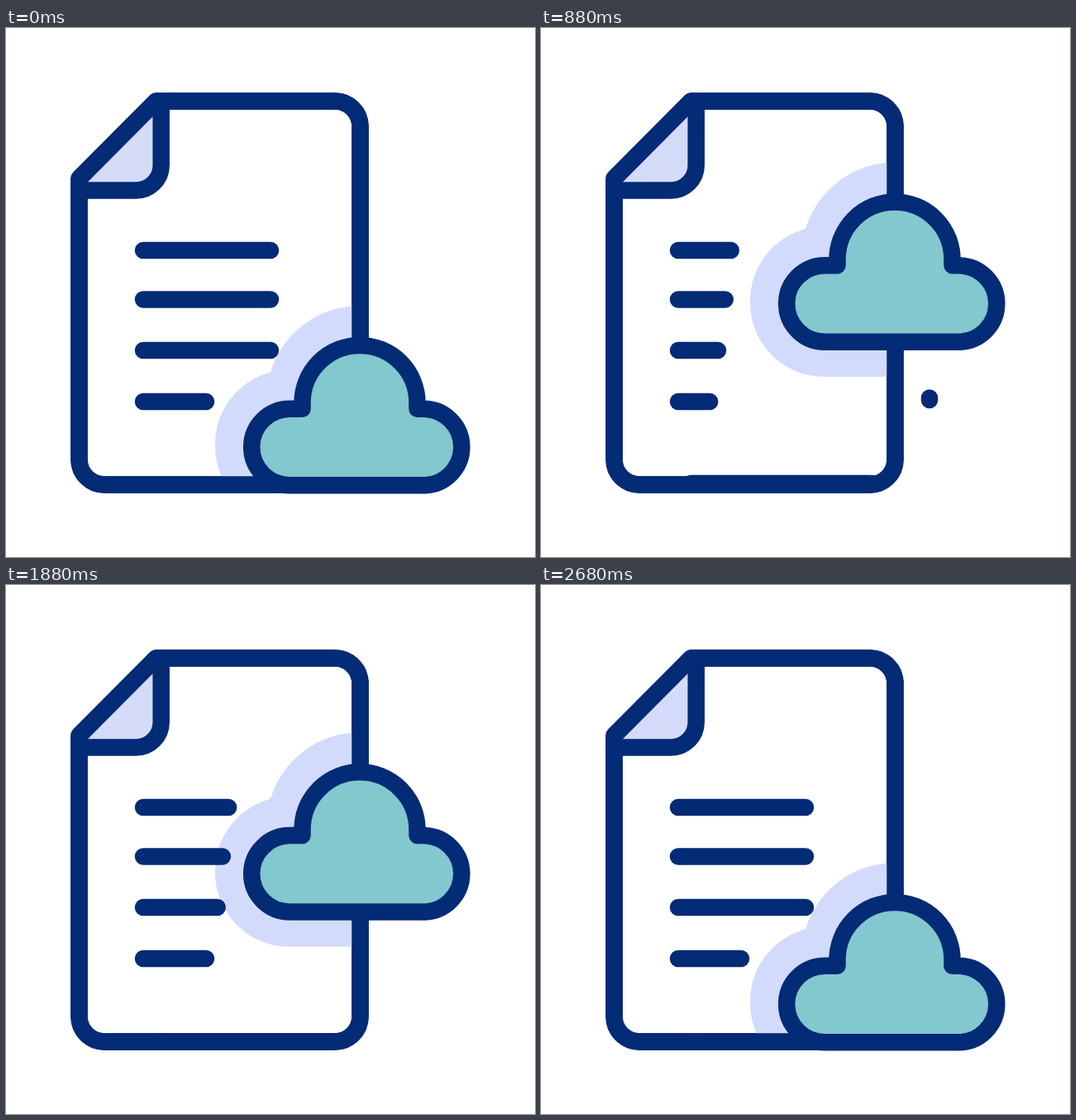
These frames come from a looping animation (640x640 px, 3 s). An HTML page:

```html
<!DOCTYPE html>
<html lang="en">
<head>
<meta charset="utf-8">
<title>Document cloud upload</title>
<style>
  html, body { margin: 0; width: 100%; height: 100%; overflow: hidden; background: #fff; }
  svg { display: block; width: 100%; height: 100%; }
  .ink { stroke: #032b76; stroke-width: 20.5; stroke-linecap: round; stroke-linejoin: round; fill: none; }
  .pale { fill: #d3dbfc; }
</style>
</head>
<body>
<svg viewBox="0 0 640 640">
  <defs>
    <path id="sheet" d="M181.5 88.5H398a30.5 30.5 0 0 1 30.5 30.5V522a30.5 30.5 0 0 1-30.5 30.5H119a30.5 30.5 0 0 1-30.5-30.5V182Z"/>
    <path id="fold" d="M187.7 88.5V166a30.5 30.5 0 0 1-30.5 30.5H88.5"/>
    <clipPath id="inSheet"><use href="#sheet"/></clipPath>
    <clipPath id="abovePage"><rect id="reveal" width="640" height="78"/></clipPath>
    <g id="page">
      <use href="#sheet" fill="#fff"/>
      <path class="pale" d="M181.5 88.5H187.7V166a30.5 30.5 0 0 1-30.5 30.5H88.5V182Z" style="fill:#d4dbf8"/>
      <use href="#fold" class="ink"/>
      <use href="#sheet" class="ink"/>
    </g>
  </defs>

  <use href="#page"/>
  <g clip-path="url(#inSheet)">
    <g id="slidingPage">
      <use href="#page"/>
      <g id="oldLines" class="ink"></g>
    </g>
    <path id="halo" class="pale" d="M440 595.5H343A90 89.5 0 0 1 253 506A90 90 0 0 1 320 416.5A113 113 0 0 1 428 336H440Z"/>
  </g>
  <use href="#sheet" class="ink"/>
  <g clip-path="url(#abovePage)"><g id="newLines" class="ink"></g></g>
  <g id="rain" class="ink"></g>
  <path id="cloud" class="ink" style="fill:#82c8ce" d="M505.1 553.2H343.4a46.2 46.2 0 0 1 0-92.4H358.5V453.5a69.5 69.5 0 0 1 139 0V460.8H505.1a46.2 46.2 0 0 1 0 92.4Z"/>
</svg>
<script>
const LOOP = 3000, STEP = 40;
const LEFT = 166, SHORT = 242;
const $ = id => document.getElementById(id);

const textLines = [
  { y: 269, end: 320 },
  { y: 328.5, end: 320 },
  { y: 390, end: 320 },
  { y: 452, end: SHORT }
];
const drops = [
  { x: 342, bottom: 450, grow: 880, shrink: 1276 },
  { x: 386.5, bottom: 488, grow: 900, shrink: 1340 },
  { x: 470, bottom: 450, grow: 820, shrink: 1256 }
];
const DROP_LENGTH = 70, DROP_TIME = 400;

// Equivalent to cubic-bezier(.5, 0, .5, 1).
function ease(u) {
  if (u <= 0) return 0;
  if (u >= 1) return 1;
  let lo = 0, hi = 1;
  for (let i = 0; i < 24; i++) {
    const s = (lo + hi) / 2;
    if (1.5 * s * (1 - s) + s ** 3 < u) lo = s; else hi = s;
  }
  return lo * lo * (3 - 2 * lo);
}
const tween = (t, start, duration) => ease((t - start) / duration);

function addStrokes(parent, items) {
  return items.map(() => parent.appendChild(
    document.createElementNS("http://www.w3.org/2000/svg", "path")));
}
function setStroke(path, x1, y1, x2, y2) {
  const visible = Math.hypot(x2 - x1, y2 - y1) > 0.01;
  path.setAttribute("d", visible ? `M${x1} ${y1}L${x2} ${y2}` : "");
}
const shiftY = (id, y) => $(id).setAttribute("transform", `translate(0 ${y})`);

const oldStrokes = addStrokes($("oldLines"), textLines);
const newStrokes = addStrokes($("newLines"), textLines);
const rainStrokes = addStrokes($("rain"), drops);

function render(t) {
  const pageY = 464 * tween(t, 387, 519);
  shiftY("slidingPage", pageY);
  $("reveal").setAttribute("height", pageY > 463.9 ? 640 : 78 + pageY);

  const cloudY = -221 * (tween(t, 413, 709) - tween(t, 1608, 703));
  shiftY("cloud", cloudY);
  shiftY("halo", cloudY);

  textLines.forEach(({ y, end }, i) => {
    const oldEnd = end + (LEFT - end) * tween(t, 226 + 45 * i, 800);
    const newEnd = LEFT + (SHORT - LEFT) * tween(t, 329 + 52 * i, 788)
      + (end - SHORT) * tween(t, 1532 + 45 * i, 825);
    setStroke(oldStrokes[i], LEFT, y, oldEnd, y);
    setStroke(newStrokes[i], LEFT, y, newEnd, y);
  });

  drops.forEach(({ x, bottom, grow, shrink }, i) => {
    const top = bottom - DROP_LENGTH * tween(t, grow, DROP_TIME);
    const tail = bottom - DROP_LENGTH * tween(t, shrink, DROP_TIME);
    setStroke(rainStrokes[i], x, tail, x, top);
  });
}

const startTime = performance.now();
function tick() {
  const t = (performance.now() - startTime) % LOOP;
  render(Math.floor(t / STEP) * STEP);
  requestAnimationFrame(tick);
}
render(0);
requestAnimationFrame(tick);
</script>
</body>
</html>
```
